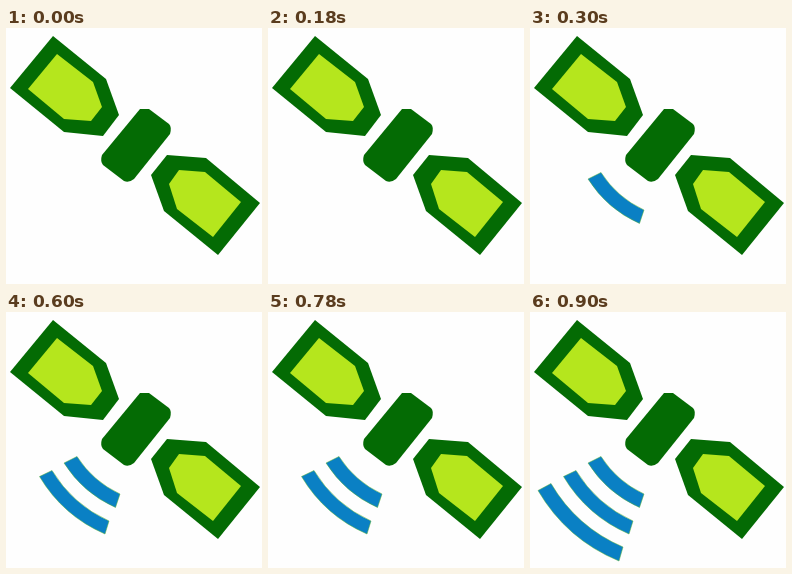
An HTML page for the animation above (1.2 s loop, 256x256 px).

```html
<!DOCTYPE html>
<html lang="en">
<head>
<meta charset="utf-8">
<title>Satellite signal</title>
<style>
  html, body { margin: 0; width: 100%; height: 100%; overflow: hidden; background: #fefefe; }
  svg { display: block; width: 100vw; height: 100vh; }
  .frame { fill: #046b04; }
  .cell { fill: #b5e61d; }
  .wave { fill: #0a80c4; stroke: #58b030; stroke-width: .5; visibility: hidden; }
</style>
</head>
<body>
<svg viewBox="0 0 256 256">
  <g class="frame">
    <path d="M47 8L100 51L113 87L97 108L58 104L4 60Z"/>
    <path d="M161 127L200 130L254 175L212 227L158 183L145 147Z"/>
    <path d="M134 81H143L163 96Q166 99 164 106L128 151Q123 155 118 153L97 137Q94 133 96 127Z"/>
  </g>
  <g class="cell">
    <path d="M51 26L87 54L96 79L85 93L58 91L22 61Z"/>
    <path d="M173 142L199 144L235 174L207 209L171 181L163 156Z"/>
  </g>
  <path class="wave" d="M71 144.5A102 102 0 0 0 114 182L109.500 195.500A117 117 0 0 1 58 151Z"/>
  <path class="wave" d="M46 158.500A128 128 0 0 0 103 209L99 222A142 142 0 0 1 33.500 164.500Z"/>
  <path class="wave" d="M21 171.500A154 154 0 0 0 93 235L89 249A168 168 0 0 1 8 178.500Z"/>
</svg>
<script>
  const STEP = 300, LOOP = 1200;
  const waves = document.querySelectorAll('.wave');
  const start = performance.now();

  // One more wave appears at each step, then all clear.
  function draw() {
    const shown = Math.floor((performance.now() - start) % LOOP / STEP);
    waves.forEach((wave, i) => {
      wave.style.visibility = i < shown ? 'visible' : 'hidden';
    });
    requestAnimationFrame(draw);
  }
  draw();
</script>
</body>
</html>
```
